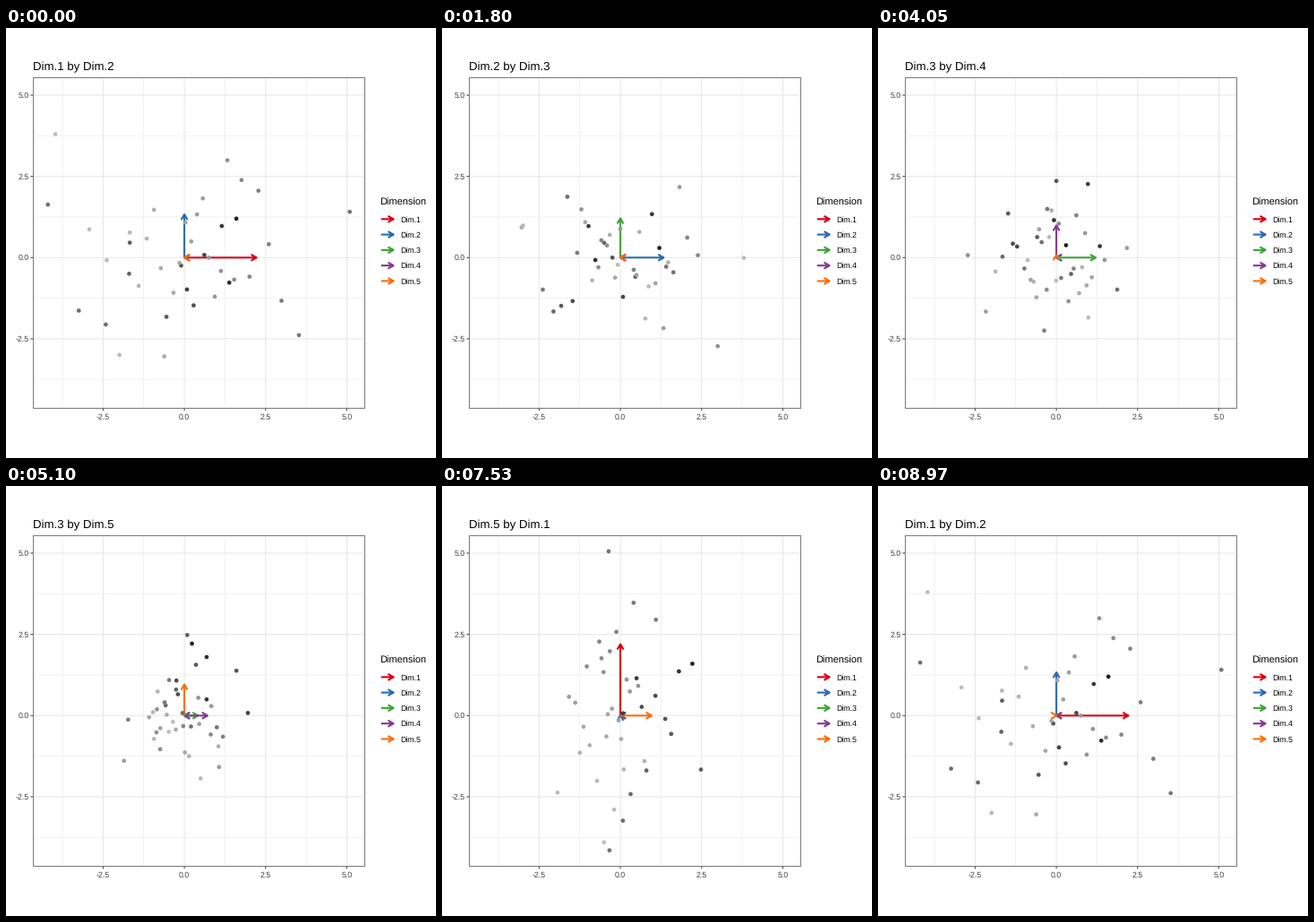
Recreate the animation shown at these times as a matplotlib script. Size 480x480 px, loop 9000 ms.

```python
import math

import matplotlib.pyplot as plt
import numpy as np
from matplotlib.animation import FuncAnimation

SIZE, DPI = 480, 72
FRAMES, STEP_MS = 300, 30
SPAN, HOLD = 30, 9            # frames per view, last resting frame of a view
X0, Y0, UNIT = 199.1, 256.3, 36.27
LEFT, RIGHT, TOP, BOTTOM = 30, 400, 55, 424

# Pairs of dimensions on the x and y axes, in playing order
VIEWS = [(1, 2), (1, 3), (2, 3), (2, 4), (3, 4),
         (3, 5), (4, 5), (4, 1), (5, 1), (5, 2)]
COLORS = ["#dc0018", "#2a6cb0", "#40a338", "#873a92", "#fc6e0a"]
LENGTHS = [2.22, 1.33, 1.21, 1.09, 0.96]

plt.rcParams["font.family"] = "Liberation Sans"
plt.rcParams["text.hinting"] = "none"
fig = plt.figure(figsize=(SIZE / DPI, SIZE / DPI), dpi=DPI, facecolor="white")
ax = fig.add_axes([0, 0, 1, 1])
ax.set_xlim(0, SIZE)
ax.set_ylim(SIZE, 0)
ax.axis("off")


def quantiles(n):
    """Evenly spaced quantiles of a standard normal, rising."""
    p = (np.arange(n) + 0.5) / n
    return 4.91 * (p ** 0.14 - (1 - p) ** 0.14)


def make_scores(small=13, large=28):
    """Two groups, each ranked along the first dimension."""
    rng = np.random.default_rng(12)
    n = small + large
    u = np.linspace(0, 1, small)
    ranked = [1.6 - 2.6 * u - 3.2 * u ** 3, 0.3 - 2 * quantiles(large)]
    scores = np.empty((n, 5))
    scores[:, 0] = np.concatenate(ranked)
    for d in (1, 2, 3):
        scores[:, d] = LENGTHS[d] * rng.permutation(quantiles(n))
    # The fifth dimension sets the groups apart
    scores[:small, 4] = 0.94 + 0.72 * rng.permutation(quantiles(small))
    scores[small:, 4] = -0.42 + 0.72 * rng.permutation(quantiles(large))
    # Outliers
    scores[3] = 0.08, -0.98, 0.97, 2.48, 0.08
    scores[8] = -1.68, 0.46, -0.59, 0.45, 2.48
    scores[13] = 5.09, 1.41, -0.28, 1.68, -0.36
    scores[31] = -0.62, -3.04, 0.93, -0.90, -0.43
    scores[40] = -3.97, 3.80, -0.01, -0.73, -0.50
    return scores


def px(v):
    return X0 + UNIT * v


def py(v):
    return Y0 - UNIT * v


def rule(xs, ys, color, width, z, snap=False):
    ax.plot(xs, ys, color=color, lw=width, solid_capstyle="butt",
            zorder=z, snap=snap)


def label(x, y, text, size, color="black", ha="left"):
    return ax.text(x, y, text, fontsize=size, color=color, ha=ha,
                   va="baseline")


def arrow_path(x, y, dx, dy):
    """Shaft and open head; an arrow without length points left."""
    angle = math.atan2(dy, dx) if math.hypot(dx, dy) > 1e-9 else math.pi
    tx, ty = x + dx, y + dy
    barbs = [(tx - 7 * math.cos(angle + a), ty - 7 * math.sin(angle + a))
             for a in (-math.pi / 6, math.pi / 6)]
    xs = [x, tx, np.nan, barbs[0][0], tx, barbs[1][0]]
    ys = [y, ty, np.nan, barbs[0][1], ty, barbs[1][1]]
    return xs, ys


def new_arrow(color, z):
    return ax.plot([], [], color=color, lw=2.1, solid_capstyle="butt",
                   solid_joinstyle="round", zorder=z)[0]


def draw_panel():
    for v in (-3.75, -1.25, 1.25, 3.75):
        rule([px(v)] * 2, [TOP, BOTTOM], "#e6e6e6", 0.5, 0)
        rule([LEFT, RIGHT], [py(v)] * 2, "#e6e6e6", 0.5, 0)
    for v in (-2.5, 0, 2.5, 5):
        rule([px(v)] * 2, [TOP, BOTTOM], "#e6e6e6", 1, 1)
        rule([LEFT, RIGHT], [py(v)] * 2, "#e6e6e6", 1, 1)
        rule([px(v)] * 2, [BOTTOM, BOTTOM + 3.2], "#333333", 1, 1)
        rule([LEFT - 2.5, LEFT], [py(v)] * 2, "#333333", 1, 1)
        label(px(v), 437.2, f"{v:.1f}", 8.8, "#404040", "center")
        label(25.6, py(v) + 3.1, f"{v:.1f}", 8.8, "#404040", "right")
    rule([LEFT, RIGHT, RIGHT, LEFT, LEFT], [TOP, TOP, BOTTOM, BOTTOM, TOP],
         "#7a7a7a", 1, 9, snap=True)


def draw_legend():
    label(417, 198.2, "Dimension", 11)
    for i, color in enumerate(COLORS):
        y = 213.3 + 17.28 * i
        new_arrow(color, 5).set_data(*arrow_path(418.7, y, 13.8, 0))
        label(439.8, y + 3.3, f"Dim.{i + 1}", 8.8)


draw_panel()
draw_legend()
title = label(30.3, 46.8, "", 13.2)

scores = make_scores()
shade = np.linspace(0.13 ** 2.2, 0.75 ** 2.2, len(scores)) ** (1 / 2.2)
dots = ax.scatter(scores[:, 0], scores[:, 1], s=4.7 ** 2, linewidths=0,
                  c=[(g, g, g) for g in shade], zorder=6)
arrows = [new_arrow(c, 4 + i / 10) for i, c in enumerate(COLORS)]


def basis(view):
    """5 x 2 matrix that picks the two dimensions of a view."""
    m = np.zeros((5, 2))
    for axis, dim in enumerate(VIEWS[view]):
        m[dim - 1, axis] = 1
    return m


def circular(t):
    if t < 0.5:
        return (1 - math.sqrt(1 - 4 * t * t)) / 2
    return (1 + math.sqrt(max(0, 1 - (2 * t - 2) ** 2))) / 2


def update(frame):
    view, k = divmod(frame, SPAN)
    rest = HOLD if view else HOLD - 1
    t = max(0, (k - rest) / (SPAN - rest))
    following = (view + 1) % len(VIEWS)
    s = circular(t)
    proj = (1 - s) * basis(view) + s * basis(following)

    xy = scores @ proj
    dots.set_offsets(np.column_stack([px(xy[:, 0]), py(xy[:, 1])]))
    for line, length, (u, v) in zip(arrows, LENGTHS, proj):
        reach = length * UNIT
        line.set_data(*arrow_path(X0, Y0, reach * u, -reach * v))

    a, b = VIEWS[following if t > 0.53 else view]
    title.set_text(f"Dim.{a} by Dim.{b}")
    return [dots, title, *arrows]


anim = FuncAnimation(fig, update, frames=FRAMES, interval=STEP_MS,
                     repeat=True, repeat_delay=0, blit=False)
plt.show()
```
